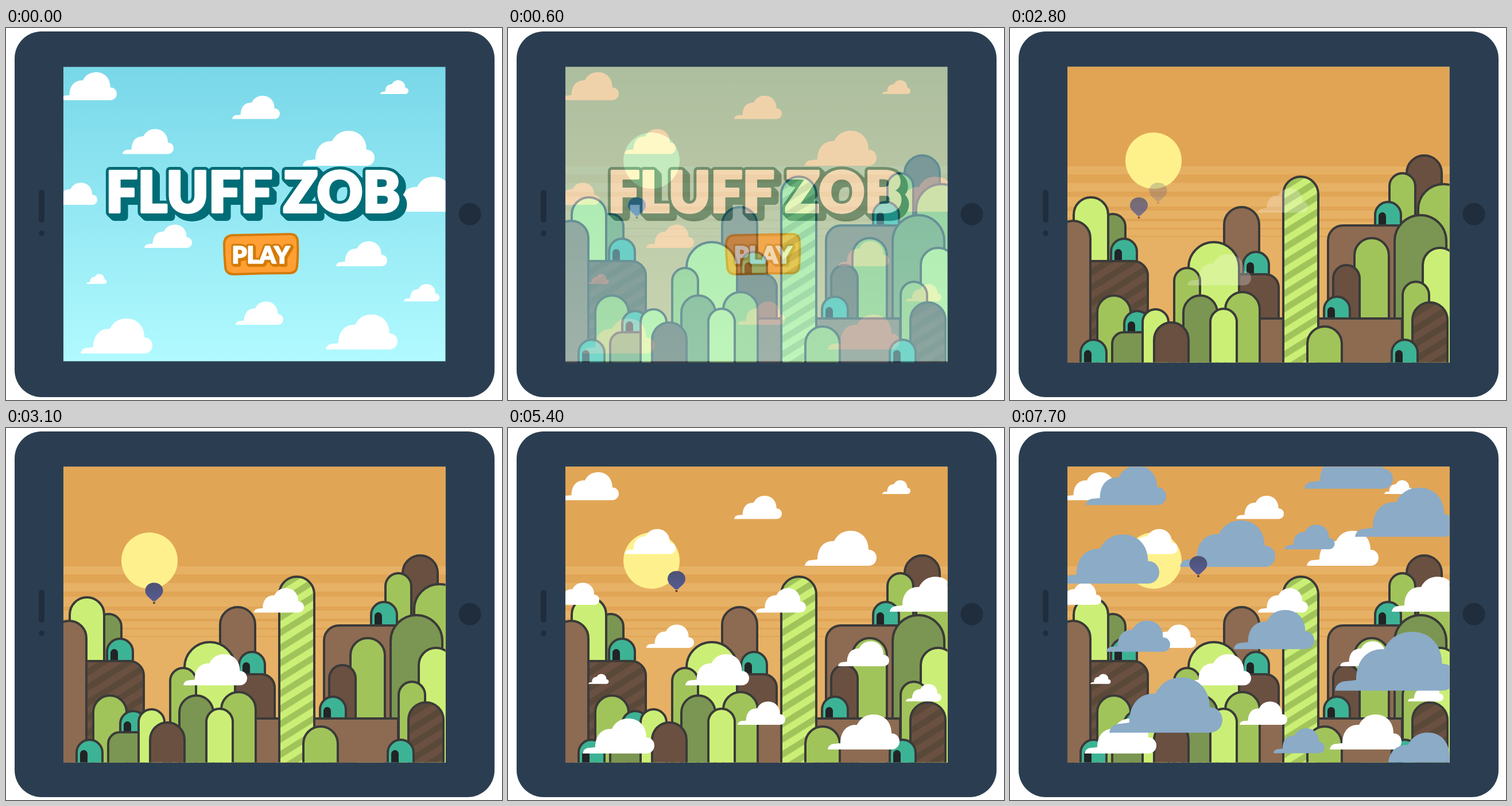
Recreate the animation shown at these times as an HTML page. Size 864 by 648 pixels, loop 8 s.

```html
<!DOCTYPE html>
<html lang="en">
<head>
<meta charset="utf-8">
<title>Cloud game</title>
<style>
  html, body { margin: 0; width: 100%; height: 100%; overflow: hidden; background: #fff; }
  svg { display: block; width: 100vw; height: 100vh; }
  text { font-family: Lato, Inter, sans-serif; font-weight: 900; text-anchor: middle; stroke-linejoin: round; }
</style>
</head>
<body>
<svg id="stage" viewBox="0 0 864 648"></svg>
<script>
const LIME = '#cbef76', GREEN = '#a1c45a', OLIVE = '#7b9652', BROWN = '#8d6b52',
  DARK = '#6a5041', TEAL = '#3db395', INK = '#3a3a39', BOTTOM = 590;

const rect = (x, y, w, h, fill, rx = 0) =>
  `<rect x="${x}" y="${y}" width="${w}" height="${h}" rx="${rx}" fill="${fill}"/>`;
const circle = (x, y, r, fill) => `<circle cx="${x}" cy="${y}" r="${r}" fill="${fill}"/>`;
const cloud = ([x, y, width]) =>
  `<use href="#cloud" transform="translate(${x} ${y}) scale(${width / 125})"/>`;
const clouds = (list, fill) => `<g fill="${fill}">${list.map(cloud).join('')}</g>`;

// left, right and top are outer edges; the 4px outline lies inside them
function mound(left, right, top, fill, bottom = BOTTOM, radius = (right - left) / 2 - 2) {
  const r = radius, x = left + 2, y = top + 2;
  return `<path fill="${fill}" stroke="${INK}" stroke-width="4" d="M${x} ${bottom}V${y + r}` +
    `a${r} ${r} 0 0 1 ${r} ${-r}H${right - 2 - r}a${r} ${r} 0 0 1 ${r} ${r}V${bottom}"/>`;
}

function house(x, y, bottom) {
  const door = `<path fill="#222425" d="M${x + 8} ${bottom}V${y + 26.5}a6.5 6.5 0 0 1 13 0V${bottom}z"/>`;
  return mound(x, x + 49, y, TEAL, bottom) + door;
}

const stripes = (id, base, stripe, y) =>
  `<pattern id="${id}" width="40" height="22.5" patternUnits="userSpaceOnUse"
    patternTransform="translate(0 ${y}) rotate(-32)">` +
  rect(0, 0, 40, 22.5, base) + rect(0, 0, 40, 11, stripe) + '</pattern>';

const balloon = (x, y) => `<g transform="translate(${x} ${y})">
  <path fill="url(#balloon)" d="M0 0C9 0 15.5 6 15.5 14C15.5 22 8 26 2.5 32H-2.5C-8 26-15.5 22-15.5 14C-15.5 6-9 0 0 0z"/>
  ${circle(0, 35, 2, '#59402f')}</g>`;

const skyClouds = [
  [93, 77, 100], [394, 118, 83], [652, 91, 49], [203, 176, 89], [517, 179, 125],
  [80, 269.5, 79], [665, 259, 125], [241, 342.5, 83], [140, 428.5, 35.5], [575, 371.5, 89],
  [693, 446, 62], [400, 476.5, 83], [130, 506, 125], [557, 499, 125]
];
const nearClouds = [[309, 394, 111], [432, 279, 87]];
const blueClouds = [
  [132, 66, 140], [513, 30.5, 154], [601, 104, 175], [478, 168.5, 87.5], [296, 161, 166],
  [85, 185.5, 175], [168, 335.5, 111], [390, 317, 140], [566, 355, 210], [173, 434.5, 197],
  [459, 523, 89], [632, 530.5, 150]
];

// [top, bottom] of the lighter haze bands
const haze = [[241, 255], [270, 285], [294, 311], [318, 332], [337, 348], [351, 362], [364, 583]];

const desert = [
  rect(100, 67, 666, 516, '#e1a556'),
  ...haze.map(([a, b]) => rect(100, a, 666, b - a, '#e6b165')),
  circle(250, 231, 49, '#fef18d'),

  mound(155, 203, 322, OLIVE),
  mound(109, 173, 293, LIME),
  house(174, 365, 405),
  mound(60, 242, 404, 'url(#darkStripes)', BOTTOM, 25),
  mound(78, 142, 334, BROWN),
  mound(150, 212, 464, GREEN),

  mound(371, 436, 310, BROWN),
  house(404, 388, 428),
  mound(360, 470, 427, DARK, BOTTOM, 23),

  mound(689, 754, 220, DARK),
  mound(709, 801, 270, GREEN),
  mound(659, 708, 251, GREEN),
  house(634, 301, 343),
  mound(552, 740, 342, BROWN, BOTTOM, 26),
  mound(668, 762, 324, OLIVE),
  mound(598, 662, 364, GREEN),
  mound(561, 611, 411, DARK),
  house(545, 466, 505),
  mound(340, 685, 504, BROWN, BOTTOM, 2),
  mound(717, 781, 381, LIME),
  mound(682, 732, 440, GREEN),
  mound(699, 764, 476, 'url(#darkStripes)'),
  house(663, 541, BOTTOM),

  mound(474, 539, 257, 'url(#cactusStripes)'),
  mound(516, 580, 518, GREEN),
  mound(309, 401, 371, LIME),
  mound(284, 333, 416, GREEN),
  mound(300, 363, 464, OLIVE),
  mound(373, 437, 458, GREEN),
  mound(347, 397, 487, LIME),
  house(197, 491, 529),
  mound(176, 260, 528, OLIVE, BOTTOM, 20),
  mound(229, 278, 488, LIME),
  mound(249, 313, 511, DARK),
  house(121, 541, BOTTOM)
].join('');

// Outlined lettering with a solid shadow towards the lower right
function lettering(words, size, color, outline, depth) {
  const draw = (offset, fill, width) => words.map(([word, x, y]) =>
    `<text x="${x + offset}" y="${y + offset}" font-size="${size}" fill="${fill}" stroke="${fill}"
      stroke-width="${width}">${word}</text>`).join('');
  let layers = '';
  for (let i = depth; i >= 0; i--) layers += draw(i, color, outline);
  return layers + draw(0, '#fff', size / 24);
}

const title = rect(100, 67.5, 666, 513, 'url(#sky)') + clouds(skyClouds, '#fff') +
  lettering([['FLUFF', 319, 321], ['ZOB', 585, 321]], 98, '#016d77', 14, 8) +
  `<path fill="#ff9f34" stroke="#d37b08" stroke-width="4" d="M394 361Q445 360 495 359Q508 359 508 373
    Q509 395 507 415Q506 427 494 427Q445 427 397 429Q383 429 382 416Q380 395 380 375Q381 362 394 361z"/>` +
  lettering([['PLAY', 444, 410]], 41, '#d37b08', 8, 2);

const white = clouds(skyClouds, '#fff'), near = clouds(nearClouds, '#fff');
const land = '<use href="#desert"/>';
const scenes = [
  { start: 500, art: land + balloon(224.5, 295) },
  { start: 2800, art: land + balloon(258, 269.5) + near },
  { start: 5100, art: land + balloon(293.5, 249) + near + white },
  { start: 7400, art: land + near + white + clouds(blueClouds, '#8babc7') + balloon(328, 223) }
];

const stage = document.getElementById('stage');
stage.innerHTML = `<defs>
  <path id="cloud" d="M0 61C1 54 6 51 13 51L22 50C22 30 33 17 51 18C57 6 67 0 80 0C98 0 111 13 111 33
    C119 33 125 39 125 47C125 55 119 61 111 61z"/>
  <linearGradient id="sky" x2="0" y2="1"><stop stop-color="#78d7e8"/><stop offset="1" stop-color="#b1faff"/></linearGradient>
  <linearGradient id="balloon" x2="0" y2="1"><stop stop-color="#4d5272"/><stop offset="1" stop-color="#565a94"/></linearGradient>
  ${stripes('cactusStripes', LIME, GREEN, 12)}${stripes('darkStripes', DARK, '#5a4939', 4)}
  <clipPath id="screen">${rect(100, 67.5, 665.5, 515, '#000')}</clipPath>
  <g id="desert">${desert}</g></defs>` +
  rect(15, 6, 836, 637, '#2b3e51', 47) +
  rect(57, 282, 10, 57, '#1f2d3d', 5) + circle(62, 357.5, 4.8, '#1f2d3d') + circle(808, 324.3, 19.5, '#1f2d3d') +
  `<g clip-path="url(#screen)">${title}` +
  scenes.map(scene => `<g class="scene">${scene.art}</g>`).join('') + '</g>';

const layers = stage.querySelectorAll('.scene');

function render() {
  const time = performance.now() % 8000;
  scenes.forEach(({ start }, i) => {
    const step = Math.floor((time - start) / 100) + 1;
    const opacity = Math.min(1, Math.max(0, step / 4));
    layers[i].setAttribute('opacity', opacity);
    layers[i].style.display = opacity ? '' : 'none';
  });
  requestAnimationFrame(render);
}
render();
</script>
</body>
</html>
```
